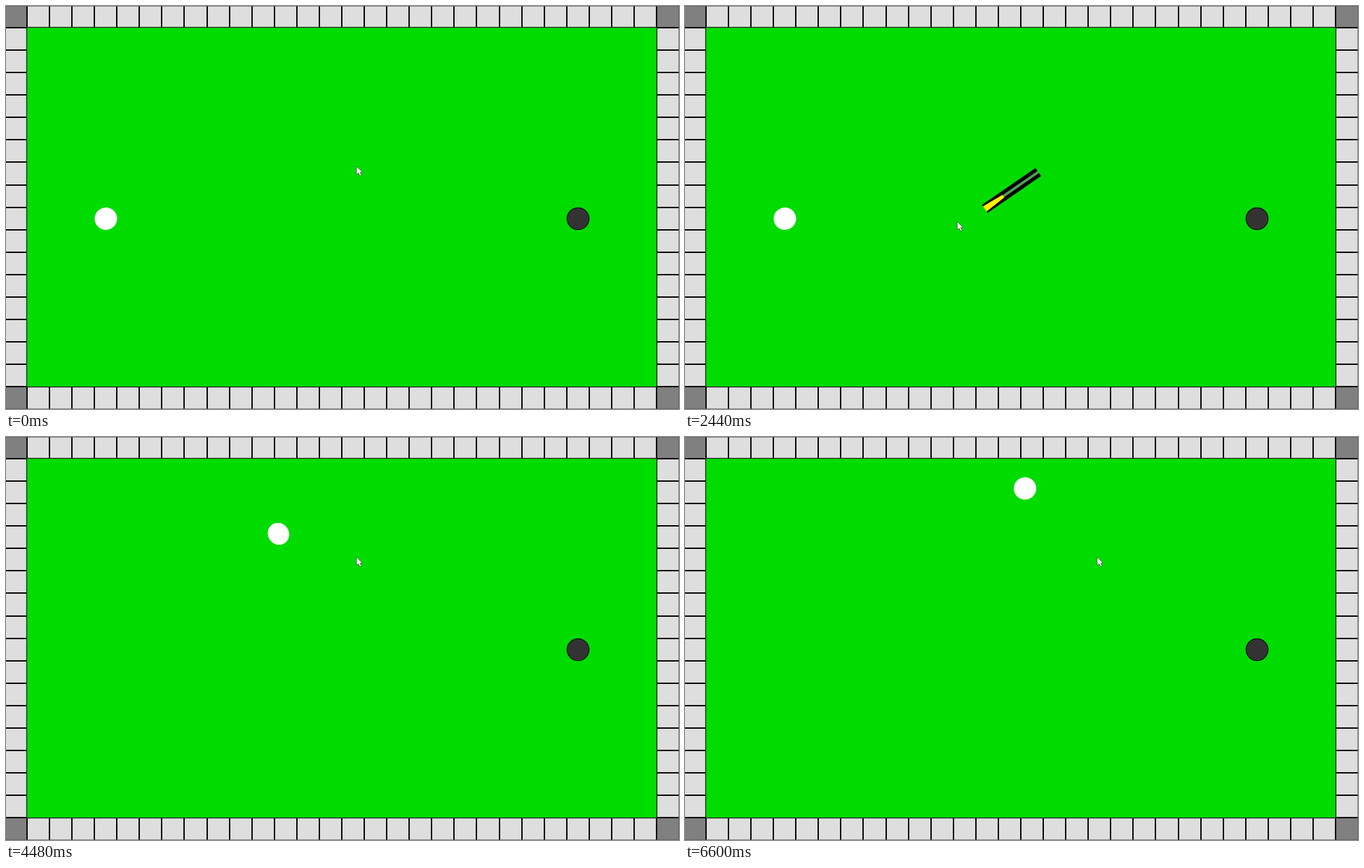
Animation, 960 px wide and 576 px high, one loop 6640 ms. Source, as an HTML page:

```html
<!DOCTYPE html>
<html lang="en">
<head>
<meta charset="utf-8">
<title>Billiards</title>
<style>
  html, body { margin: 0; width: 100%; height: 100%; overflow: hidden; background: #00dc00; }
  svg { display: block; width: 960px; height: 576px; }
</style>
</head>
<body>
<svg viewBox="0 0 960 576">
  <rect width="960" height="576" fill="#dedede"/>
  <g fill="#808080">
    <rect width="30" height="30"/>
    <rect x="929" width="31" height="30"/>
    <rect y="545" width="30" height="31"/>
    <rect x="929" y="545" width="31" height="31"/>
  </g>
  <path id="joints" stroke="#0a0a0a" stroke-width="2"/>
  <path d="M0 .5H960M0 575.5H960M959.5 0V576" stroke="#555" opacity=".6"/>
  <rect x="29.5" y="30.5" width="899" height="514" fill="#00dc00" stroke="#222" stroke-width="1.3"/>
  <circle cx="816" cy="304" r="15.7" fill="#333" stroke="#0a0f0a" stroke-width="1.2"/>
  <ellipse id="ball" rx="16" ry="16" fill="#fff"/>
  <g id="gauge"></g>
  <path id="cursor" d="M0 0V12L2.8 9.6L5 14L7 13L5 8.8H8.4Z" fill="#fff" stroke="#444" stroke-width=".7"/>
</svg>
<script>
const LOOP = 6640, STEP = 40;
const RELEASE = 3500, DECAY = 0.00124;
const BALL = { x: 142.5, y: 304, dx: 350, dy: -235.5 };
const GRAB = { x: 504, y: 237.2 };
const UNIT = 31, PITCH = 30.4;

// Pointer tip: time, x, y
const pointerPath = [
  [0, 500, 229], [1000, 500, 229], [1360, 462, 257], [1960, 423, 286],
  [2680, 371, 319], [3000, 366.5, 322], [3240, 366, 322], [3400, 366, 322],
  [3920, 368, 308.5], [4480, 500, 171.5], [5280, 543, 149], [6600, 588, 171.5]
];

const byId = id => document.getElementById(id);
const ball = byId("ball"), gauge = byId("gauge"), cursor = byId("cursor");

function drawJoints() {
  let d = "";
  for (let i = 0; i <= 28; i++) {
    const x = Math.round(29.9 + i * 32.08);
    d += `M${x} 0V30M${x} 545V576`;
  }
  for (let i = 0; i <= 16; i++) {
    const y = Math.round(31 + i * 32.08);
    d += `M0 ${y}H29M929 ${y}H960`;
  }
  byId("joints").setAttribute("d", d);
}

function gaugeUnit(index) {
  const charged = index >= 2;
  const core = charged
    ? '<path d="M0 -2.3L32 -4.5V4.5L0 2.3Z" fill="#ffee00"/>'
    : '<path d="M0 0H32" stroke="#6f8a6f" stroke-width="2.6"/>';
  return `<g transform="translate(${index * PITCH})">
    <path d="M0 -4.4H32M0 4.4H32" stroke="#000" stroke-width="5.2"/>${core}</g>`;
}

const units = [];
for (let i = 0; i < 4; i++) {
  gauge.insertAdjacentHTML("beforeend", gaugeUnit(i));
  units.push(gauge.lastElementChild);
}

function pointerAt(t) {
  const next = pointerPath.findIndex(p => p[0] > t);
  if (next < 0) return pointerPath[pointerPath.length - 1].slice(1);
  const [t0, x0, y0] = pointerPath[next - 1];
  const [t1, x1, y1] = pointerPath[next];
  const u = (t - t0) / (t1 - t0);
  return [x0 + (x1 - x0) * u, y0 + (y1 - y0) * u];
}

function render(t) {
  const [x, y] = pointerAt(t);
  cursor.setAttribute("transform", `translate(${x} ${y})`);

  const dx = x + 4 - GRAB.x, dy = y + 6.5 - GRAB.y;
  const count = t < RELEASE ? Math.floor(Math.hypot(dx, dy) / UNIT) - 1 : 0;
  const angle = Math.atan2(dy, dx) * 180 / Math.PI;
  gauge.setAttribute("transform", `translate(${GRAB.x} ${GRAB.y}) rotate(${angle})`);
  units.forEach((unit, i) => unit.setAttribute("display", i < count ? "inline" : "none"));

  // Exponential slowing; the ball flattens along its path with speed
  const speed = t < RELEASE ? 0 : Math.exp(-DECAY * (t - RELEASE));
  const travel = t < RELEASE ? 0 : 1 - speed;
  const heading = Math.atan2(BALL.dy, BALL.dx) * 180 / Math.PI;
  const squash = 1 - 0.77 * speed * speed;
  ball.setAttribute("transform",
    `translate(${BALL.x + BALL.dx * travel} ${BALL.y + BALL.dy * travel}) rotate(${heading}) scale(${squash} 1)`);
}

drawJoints();
render(0);
const start = performance.now();
function tick() {
  const t = (performance.now() - start) % LOOP;
  render(Math.floor(t / STEP) * STEP);
  requestAnimationFrame(tick);
}
requestAnimationFrame(tick);
</script>
</body>
</html>
```
